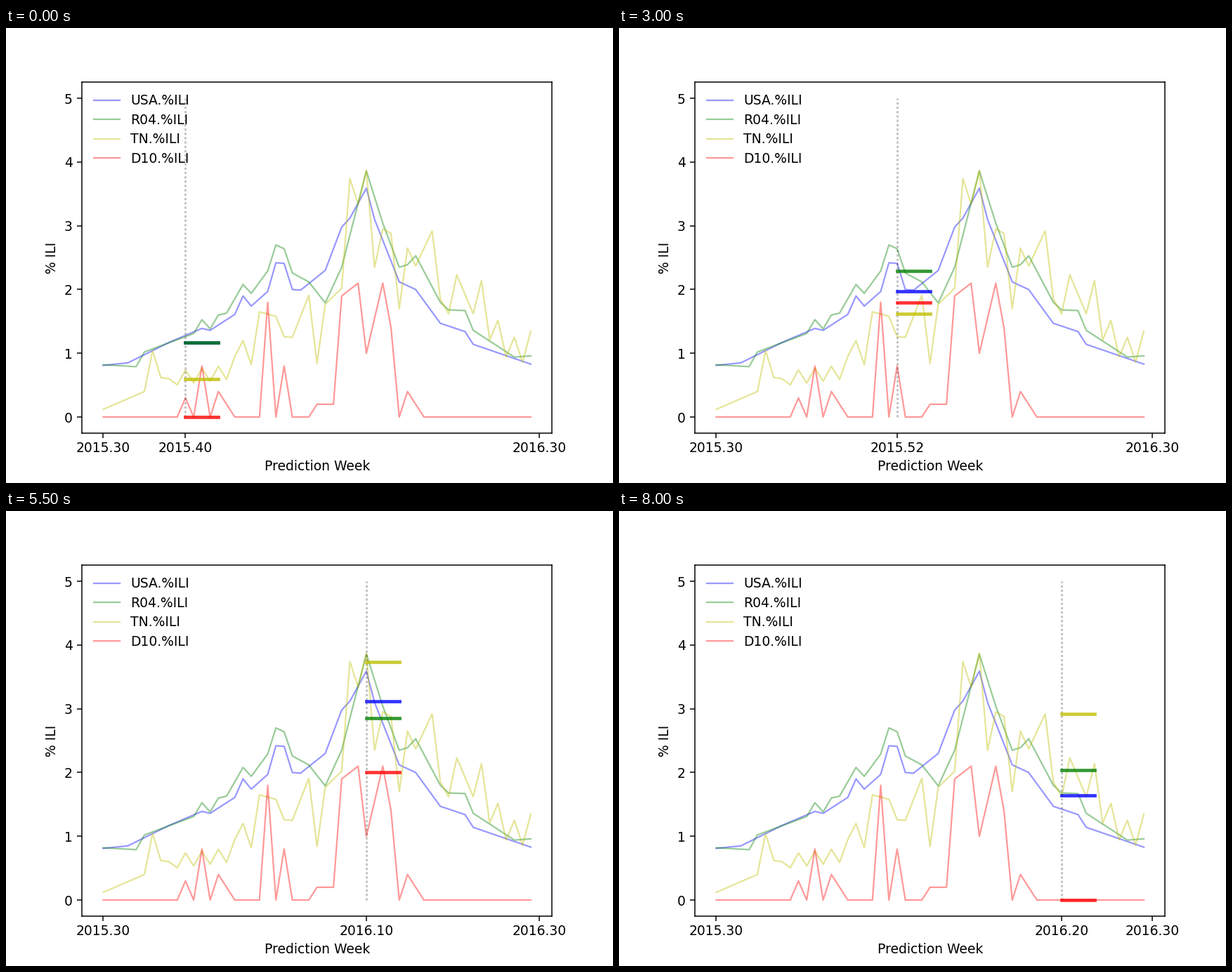
Animation of 864x648 px, one loop 8250 ms. Source, as a matplotlib script:

```python
import numpy as np
import matplotlib.pyplot as plt
from matplotlib.animation import FuncAnimation

FIRST = 10      # first predicted week
LAG = 2         # reports arrive two weeks late
SPAN = 4        # weeks covered by each prediction
FRAMES = 33
INTERVAL = 250

weeks = np.arange(53)


def curve(knots):
    """Weekly values on straight segments between {week: value} turning points."""
    return np.interp(weeks, list(knots), list(knots.values()))


def zigzag(start, stop, size):
    """Alternating ups (even weeks) and downs within a range of weeks."""
    inside = (weeks >= start) & (weeks < stop)
    return inside * size * np.where(weeks % 2, -1, 1)


def spikes(peaks):
    """Isolated one-week peaks over a zero base."""
    return sum(h * np.clip(1 - abs(weeks - w), 0, 1) for w, h in peaks.items())


usa = curve({0: .81, 3: .85, 8: 1.17, 12: 1.39, 13: 1.36, 16: 1.61, 17: 1.9,
             18: 1.74, 20: 1.97, 21: 2.42, 22: 2.41, 23: 2, 24: 1.99, 27: 2.3,
             29: 2.98, 30: 3.12, 32: 3.59, 33: 3.1, 36: 2.12, 38: 2, 41: 1.47,
             44: 1.34, 45: 1.14, 52: .83})

region = curve({0: .82, 4: .79, 5: 1.02, 11: 1.31, 14: 1.6, 15: 1.63,
                17: 2.08, 18: 1.94, 20: 2.29, 21: 2.7, 22: 2.64, 23: 2.26,
                25: 2.12, 27: 1.79, 29: 2.35, 32: 3.86, 34: 3.04, 36: 2.35,
                37: 2.39, 38: 2.53, 41: 1.8, 42: 1.68, 44: 1.67, 45: 1.36,
                50: .94, 52: .96}) + zigzag(12, 14, .12)

state = curve({0: .12, 5: .4, 6: 1.04, 7: .62, 8: .6, 15: .7, 17: 1.2, 18: .82,
               19: 1.65, 21: 1.58, 22: 1.26, 23: 1.25, 25: 1.91, 26: .84,
               27: 1.77, 29: 2.02, 30: 3.74, 31: 3.34, 32: 3.87, 33: 2.35,
               34: 2.95, 35: 2.88, 36: 1.7, 37: 2.65, 38: 2.37, 40: 2.92,
               41: 1.85, 42: 1.62, 43: 2.23, 45: 1.62, 46: 1.92, 47: 1.43,
               50: 1.03, 52: 1.13})
state += zigzag(9, 16, .11) + zigzag(46, 53, .22)

district = curve({25: 0, 26: .2, 28: .2, 29: 1.9, 31: 2.1, 32: 1, 34: 2.1,
                  35: 1.4, 36: 0})
district += spikes({10: .3, 12: .8, 14: .4, 15: .2, 20: 1.8, 22: .8,
                    37: .4, 38: .2})

SERIES = [("USA.%ILI", "b", usa), ("R04.%ILI", "g", region),
          ("TN.%ILI", "y", state), ("D10.%ILI", "r", district)]


def week_label(i):
    week = 30 + i
    return f"2015.{week}" if week <= 52 else f"2016.{week - 52:02d}"


plt.rcParams["font.family"] = "DejaVu Sans"
fig, ax = plt.subplots(figsize=(6.4, 4.8), dpi=135)
fig.subplots_adjust(right=0.8998, top=0.8805)

for name, color, values in SERIES:
    ax.plot(weeks, values, color=color, alpha=0.4, lw=1.2, label=name)
marker, = ax.plot([FIRST, FIRST], [0, 5], "k", ls=(0, (1.1, 1.1)),
                  lw=1.5, alpha=0.25)
bars = [ax.plot([], [], color=color, alpha=0.8, lw=2.5)[0]
        for _, color, _ in SERIES]

ax.set_xlim(-0.05 * weeks[-1], 1.05 * weeks[-1])
ax.set_ylim(-0.25, 5.25)
ax.set_yticks(range(6))
ax.tick_params(axis="x", pad=3)
ax.set_xlabel("Prediction Week")
ax.set_ylabel("% ILI")
ax.legend(loc="upper left", frameon=False, labelspacing=0.455)


def update(frame):
    now = FIRST + frame
    marker.set_xdata([now, now])
    for bar, (_, _, values) in zip(bars, SERIES):
        level = values[now - LAG]
        bar.set_data([now, now + SPAN], [level, level])
    ax.set_xticks([0, now, len(weeks)],
                  [week_label(0), week_label(now), "2016.30"])
    return [marker, *bars]


anim = FuncAnimation(fig, update, frames=FRAMES, interval=INTERVAL,
                     init_func=lambda: update(0), repeat=True, repeat_delay=0)
plt.show()
```
